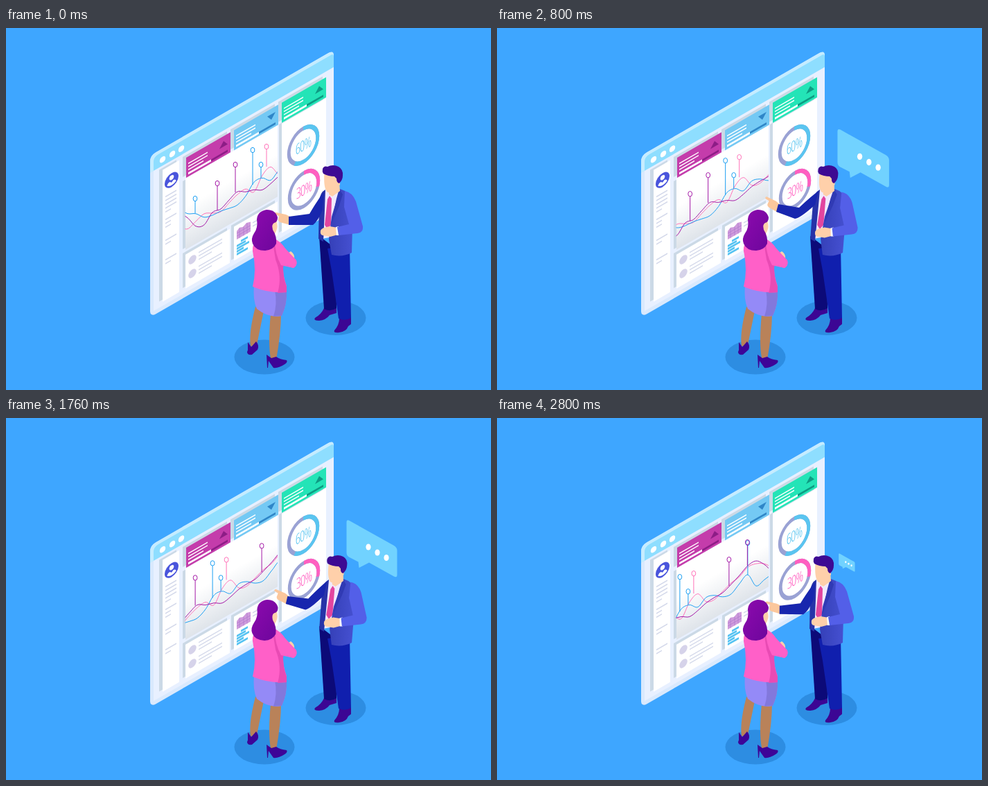
An HTML page for the animation above (8 s loop, 700 px wide and 522 px high).

```html
<!DOCTYPE html>
<html lang="en">
<head>
<meta charset="utf-8">
<title>Dashboard talk</title>
<style>
html, body { margin: 0; width: 100%; height: 100%; overflow: hidden; background: #3ea6ff; }
svg { display: block; width: 100vw; height: 100vh; }
.ln { fill: none; stroke: #d3d8ea; stroke-width: 1.6; }
.wl { fill: none; stroke: #fff; stroke-width: 1.7; }
.sh { fill: #cbd9e6; }
.pct { font: 300 21px "Open Sans", "Noto Sans", sans-serif; font-stretch: 75%; letter-spacing: -1px; text-anchor: middle; }
.ring { fill: none; stroke-width: 5.6; }
.skin { fill: #ffd0aa; }
</style>
</head>
<body>
<svg viewBox="0 0 700 522" preserveAspectRatio="none">
  <defs>
    <linearGradient id="fade" x1="0" y1="0" x2="0" y2="1">
      <stop offset=".4" stop-color="#fff"/><stop offset="1" stop-color="#dfe4ea"/>
    </linearGradient>
    <linearGradient id="coat" x1="0" y1="0" x2="1" y2="0">
      <stop offset="0" stop-color="#3540b8"/><stop offset="1" stop-color="#4651d2"/>
    </linearGradient>
    <linearGradient id="hair" x1="0" y1="0" x2="1" y2="1">
      <stop offset="0" stop-color="#8d0aae"/><stop offset="1" stop-color="#6d069c"/>
    </linearGradient>
    <clipPath id="view"><path d="M258.500 219L392 142V243L258.500 320Z"/></clipPath>
  </defs>
  <rect width="700" height="522" fill="#3ea6ff"/>

  <!-- dashboard window -->
  <g transform="translate(208 0) skewY(-29.9)">
    <rect y="184" width="265" height="233" rx="8" fill="#d9e9fd"/>
    <path d="M0 209V192Q0 184 8 184H257Q265 184 265 192V209Z" fill="#c5ecff"/>
    <path d="M5 209V196Q5 189 12 189H261Q265 189 265 194V209Z" fill="#8edeff"/>
    <path d="M5 209H265V411H5Z" fill="#e8f0ff"/>
    <g fill="#fff"><circle cx="18" cy="200" r="4.200"/><circle cx="32" cy="200" r="4.200"/><circle cx="45" cy="200" r="4.200"/></g>
    <path class="sh" d="M13 212H38V402H13ZM47 248H180V346H47ZM47 352H111V402H47ZM117 352H180V402H117ZM186 246H250V402H186Z"/>
    <path fill="#fff" d="M18 215H42V405H18ZM51 356H115V405H51ZM121 356H184V405H121ZM190 247H254V405H190Z"/>
    <rect x="51" y="246" width="133" height="103" fill="url(#fade)"/>
    <circle cx="31" cy="237" r="10" fill="#4a55dc"/>
    <circle cx="31" cy="233.500" r="3.300" fill="#fff"/>
    <path d="M24.500 242Q25 238.500 28.500 238.500L31 240.500L33.500 238.500Q37 238.500 37.500 242Q31 247 24.500 242Z" fill="#fff"/>
    <path class="ln" d="M22 256h16M22 261.500h16M22 267h16M22 272.500h16M22 278h8M22 289h16M22 294.500h8M22 300h8M22 319h16M22 324.500h8M22 347h16M22 352.500h8"/>
    <g id="cards"></g>
    <g id="rings"></g>
    <g fill="#d6d3ea"><circle cx="61" cy="369" r="5.800"/><circle cx="61" cy="389" r="5.800"/></g>
    <path class="ln" d="M70 364h34M70 369h34M70 374h19M70 384h34M70 389h34M70 394h19M148 366h30M148 371h20"/>
    <path d="M125 365L129 362L134 364L139 361L145 363V377H125Z" fill="#cf9cdc"/>
    <path class="ln" style="stroke:#b27bd0;stroke-width:.7" d="M125 368h20M125 372h20M129 363v14M135 364v13M140 362v15"/>
    <path d="M125 385h13v3h-13ZM125 389h18v3h-18ZM125 393h10v3h-10ZM125 397h16v3h-16ZM131 381h10v3h-10Z" fill="#55c3f2"/>
  </g>

  <!-- scrolling chart -->
  <g clip-path="url(#view)"><g id="chart" fill="none" stroke-width="1"></g></g>

  <g fill="#2d8de2"><ellipse cx="476" cy="418" rx="43.500" ry="25"/><ellipse cx="373" cy="474.500" rx="43.500" ry="25"/></g>

  <!-- speech bubble -->
  <g id="bubble">
    <path d="M491.500 150Q491.500 146 495.500 148L560 184Q564.500 187 564.500 191V226Q564.500 231 560 228.500L524 208.500L509.500 216L508.500 207.500L495 200.500Q491.500 198.500 491.500 194Z" fill="#71d2ff"/>
    <g id="dots" fill="#fff"><ellipse cx="523" cy="186" rx="3.600" ry="4.600"/><ellipse cx="536" cy="194" rx="3.600" ry="4.600"/><ellipse cx="549" cy="201.500" rx="3.600" ry="4.600"/></g>
  </g>

  <!-- man -->
  <g>
    <path d="M446 418Q443 422 452 422Q462 421 467 414L477 411V403L459 404Q455 413 446 418ZM474 436Q472 440 481 439Q491 438 494 430L498 427V417L481 419Q481 428 474 436Z" fill="#3c0694"/>
    <path d="M452 300L476 318L477 404Q468 410 459 405Z" fill="#0c0a78"/>
    <path d="M464 318L496 314L498 418Q489 423 480 419L470 350Z" fill="#101fae"/>
    <g id="torso">
      <path d="M459 235L480 231L477 300L456 304Z" fill="#f1eaff"/>
      <path d="M467 242L470 246L469 284L464 290L460 284L464 247Z" fill="#e2459f"/>
      <path d="M461 233Q453 237 452 250L451 304L458 308L460 262Z" fill="#2733a8"/>
      <path d="M482 232Q496 236 501 250L499 324Q485 331 470 327L466 305L470 272Z" fill="url(#coat)"/>
      <path d="M481 232L486 240L481 256L469 284L477 246Z" fill="#303ab4"/>
      <path class="skin" d="M466 228L481 222L482 235L471 243L466 240Z" fill="#ffd0aa"/>
      <path class="skin" d="M459.500 209Q458 229 463 236Q468 240 475 234L482 226V210Z"/>
      <path d="M457 203Q459 198 464 200Q472 196 480 200Q487 204 486 213Q486 219 481 224Q477 223 477 217L474 214Q465 214 458 210Q456 207 457 203Z" fill="#3d0a93"/>
      <g id="sleeve">
        <path class="skin" d="M479 288L467 286Q455 288 454 292Q453 298 457 299L468 301L479 298Z"/>
        <path d="M476 287L480 286L481 299L477 299Z" fill="#fff"/>
        <path d="M489 235Q500 237 505 250L515 286Q516 295 507 296L480 299L478 287L495 283L488 258Z" fill="#535fe8"/>
      </g>
    </g>
    <g id="hand"><path d="M2-6L-4-9L-18-12Q-21-12-20-9L-14-7L-15-2Q-15 2-9 3L2 6Z" fill="#fbc79c"/></g>
    <path id="arm" fill="#1826ae"/>
  </g>

  <!-- woman -->
  <g>
    <path d="M360 402L372 408L362 457L353 459Q350 440 360 402ZM382 412L397 411Q397 440 390 478L382 476Q378 455 382 412Z" fill="#b98259"/>
    <path d="M349 453L354 460L361 452Q366 458 363 464L355 471Q348 472 348 467L350 462V470H349ZM376 471L383 476L390 474Q395 478 405 479Q407 482 402 485Q393 491 386 490L379 480L378 490H377Z" fill="#3d0598"/>
    <path d="M358 371L405 379Q406 398 398 415Q380 419 362 405Q356 392 358 371Z" fill="#948af7"/>
    <path d="M388 378L405 379Q406 398 398 415L386 416Q392 398 388 378Z" fill="#8278dc"/>
    <path class="skin" d="M402 328L411 322Q417 326 416 333L406 337Z"/>
    <path d="M362 308L388 304Q396 308 403 318L419 335Q421 342 415 346L400 342Q399 356 405 372V381Q380 383 356 373Q362 350 356 322Q355 312 362 308Z" fill="#ff60c8"/>
    <path d="M385 309Q394 318 401 341L400 346Q400 360 405 373V381L392 382Q399 358 389 334Z" fill="#e94bb4"/>
    <path d="M388 305Q397 308 403 318L419 335Q421 343 415 346L397 342Q388 326 388 305Z" fill="#ff60c8"/>
    <g id="head">
      <path class="skin" d="M378 279L390 278Q393 286 390 293L387 298L376 300Z"/>
      <path d="M362 276Q363 264 376 262Q389 262 392 273Q392 280 387 281Q383 283 385 291Q391 300 390 311Q386 320 374 321Q360 321 356 311Q353 304 358 296Q364 288 362 276Z" fill="url(#hair)"/>
    </g>
  </g>
</svg>
<script>
const $ = id => document.getElementById(id);

// header cards
const cards = [['#c43cab', '#8d1d86', 1], ['#74c9f4', '#2f86c8', 0], ['#24e4b7', '#0e9b83', 1]];
$('cards').innerHTML = cards.map(([fill, dark, up], i) => `<g transform="translate(${i * 69})">
  <rect class="sh" x="47" y="213" width="64" height="29"/>
  <rect x="52" y="217" width="64" height="29" fill="${fill}"/>
  <path class="wl" d="M55 227h28M55 231.500h28M55 236h22"/>
  <path class="wl" style="stroke-width:3" d="M55 241.500h33"/>
  <path class="wl" style="stroke-width:3;stroke:${dark}" d="M88 241.500h24"/>
  <path d="${up ? 'M100 232L106 224L112 232Z' : 'M100 225L106 233L112 225Z'}" fill="${dark}"/></g>`).join('');

// percentage rings
$('rings').innerHTML = [[221, 296, 60, '#5ac5f0'], [222, 360.5, 30, '#ff5fc0']].map(([x, y, n, c]) =>
  `<g transform="translate(${x} ${y}) scale(.866 1)"><circle class="ring" r="24" stroke="#9aa2d4"/>
  <circle class="ring" r="24" stroke="${c}" pathLength="100" stroke-dasharray="${n} 100" transform="rotate(-90)"/>
  <text class="pct" y="8" fill="${c}">${n}%</text></g>`).join('');

// waves: heights below a rising baseline, one every 12px
const SLOPE = 0.577, BLUE = '#1c9ff2', PURPLE = '#a318a6', PINK = '#ff72b8';
const waves = [
  [PINK, [10, 20, 16, 12, 18, 23, 17, 12, 11, 22, 5, 0, 18, 22, 17, 12, 10, 3, 5, 12, 24]],
  [BLUE, [-15, -2, 5, 17, 21, 22, 25, 27, 21, 8, 9, 19, 12, 16, 25, 28, 20, 14, 37, 35, 34]],
  [PURPLE, [-9, 4, 23, 28, 17, 19, 13, 8, 15, 19, 26, 24, 20, 19, 19, 14, 8, 1, 1, 13, 30]]
];
// x, ring y, foot y, colour
const pins = [
  [273, 246, 267, BLUE], [305, 224, 263, PURPLE], [331, 197, 237, PURPLE], [356, 176, 226, BLUE],
  [368, 197, 216, BLUE], [376, 171, 200, PINK], [427, 151, 189, PURPLE],
  [454, 127, 173, BLUE], [453.500, 126, 160, PURPLE]
];
function smooth(hs) {
  const pts = hs.map((h, i) => [250 + 12 * i, 272 - SLOPE * (12 * i - 8) + h]);
  let d = 'M' + pts[0];
  for (let i = 0; i < pts.length - 1; i++) {
    const p = pts[i], q = pts[i + 1], a = pts[i - 1] || p, b = pts[i + 2] || q;
    d += `C${p[0] + 4},${p[1] + (q[1] - a[1]) / 6} ${q[0] - 4},${q[1] - (b[1] - p[1]) / 6} ${q}`;
  }
  return d;
}
$('chart').innerHTML = waves.map(([c, hs]) => `<path d="${smooth(hs)}" stroke="${c}"/>`).join('') +
  pins.map(([x, y, foot, c]) => `<g stroke="${c}"><ellipse cx="${x}" cy="${y}" rx="2.900" ry="3.700"/><path d="M${x} ${y + 3.7}V${foot}"/></g>`).join('');

// piecewise linear track of [time, value]
function track(keys, t) {
  let [t0, v0] = keys[0];
  for (const [t1, v1] of keys) {
    if (t <= t1) return t1 === t0 ? v1 : v0 + (v1 - v0) * (t - t0) / (t1 - t0);
    [t0, v0] = [t1, v1];
  }
  return v0;
}
const size = [[0, 0], [80, .1], [160, .38], [240, .66], [320, .89], [400, 1], [480, 1.04], [560, 1.055],
  [640, 1.05], [800, 1.02], [960, 1], [2560, 1], [2640, .81], [2800, .32]];
const lean = [[0, 0], [160, .05], [320, .25], [640, 1], [2400, 1], [2640, .3], [2800, 0]];
const lift = [[0, 0], [240, .05], [320, .12], [480, .5], [640, .9], [800, 1], [1120, .84], [1440, .84],
  [1760, .84], [2160, 1], [2400, .84], [2640, .3], [2800, .07]];
const nod = [[960, 0], [1440, .6], [1760, 1], [2160, 1], [2640, 0]];
const armLow = [459, 236, 449, 249, 438, 268, 408, 272, 408, 284, 443, 284, 450, 279, 457, 262];
const armHigh = [464, 235, 453, 243, 436, 259, 406, 254, 403, 265, 430, 275, 438, 274, 459, 255];

function draw(now) {
  const t = Math.min(Math.floor(now % 8000 / 80) * 80, 2800);
  const x = -0.0329 * t, s = track(size, t), b = track(lean, t), a = track(lift, t);
  $('chart').setAttribute('transform', `translate(${x} ${-x * SLOPE})`);
  $('bubble').setAttribute('transform', `translate(494 218) scale(${s}) translate(-494 -218)`);
  [...$('dots').children].forEach((dot, i) => dot.setAttribute('opacity', t >= 400 + 80 * i ? 1 : 0));
  const k = 0.055 * b;
  $('torso').setAttribute('transform', `matrix(1 0 ${-k} 1 ${k * 325} 0)`);
  $('sleeve').setAttribute('transform', `translate(${3.5 * b} ${1.5 * b})`);
  const p = armLow.map((v, i) => v + (armHigh[i] - v) * a);
  $('arm').setAttribute('d', `M${p.slice(0, 2)}Q${p.slice(2, 4)} ${p.slice(4, 6)}L${p.slice(6, 10)} ${p.slice(10, 12)}Q${p.slice(12, 14)} ${p.slice(14)}Z`);
  $('hand').setAttribute('transform', `translate(${(p[6] + p[8]) / 2} ${(p[7] + p[9]) / 2}) rotate(${14 * a})`);
  $('head').setAttribute('transform', `rotate(${1.8 * track(nod, t)} 376 290)`);
  requestAnimationFrame(() => draw(performance.now() - start));
}
const start = performance.now();
draw(0);
</script>
</body>
</html>
```
